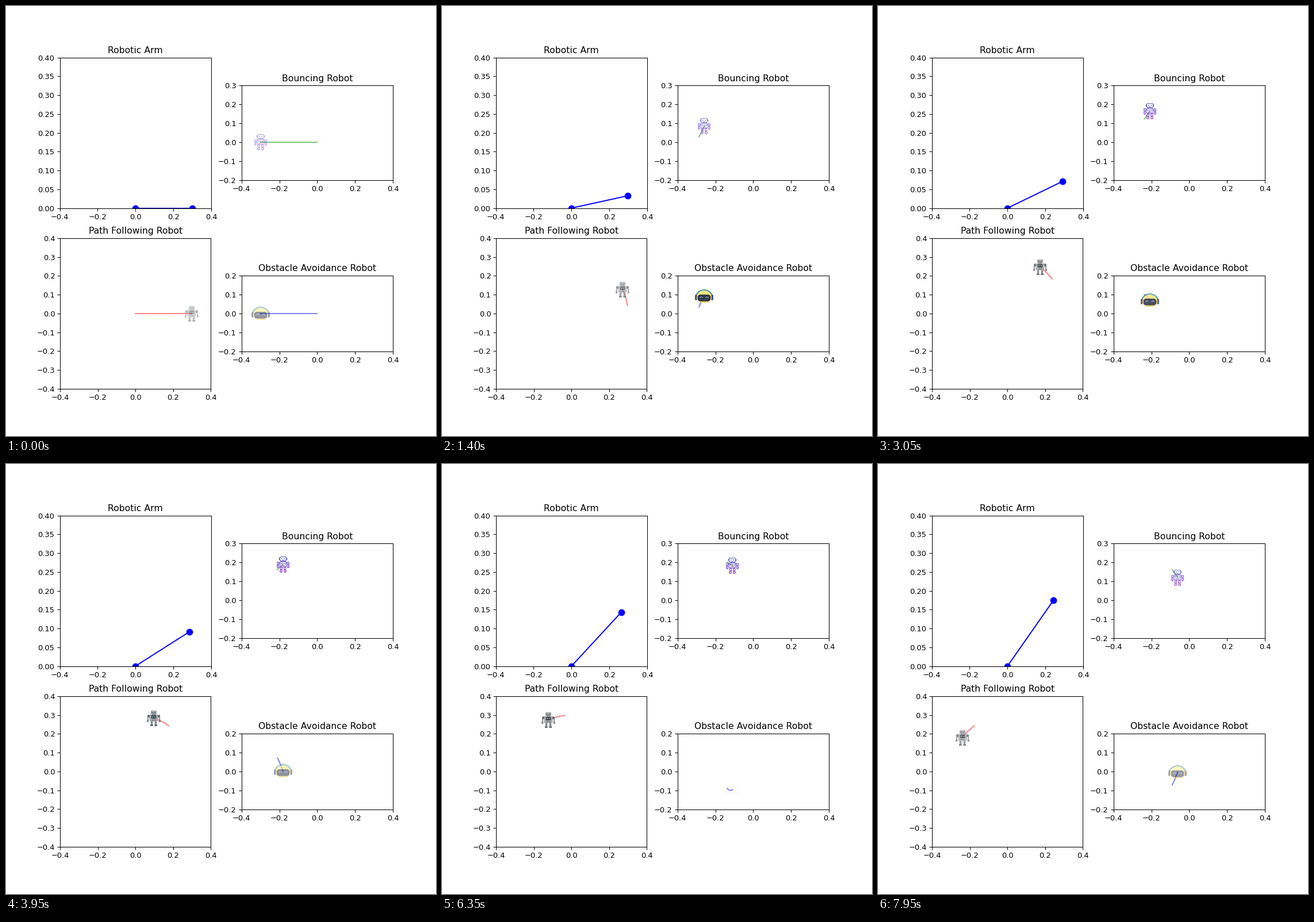
Write a matplotlib script that moves like this. It is 748x748 px and loops after 8000 ms.

```python
import numpy as np
import matplotlib.pyplot as plt
from matplotlib.animation import FuncAnimation
from matplotlib.offsetbox import AnnotationBbox, OffsetImage

FRAMES, INTERVAL = 160, 50
CYCLE = 400          # steps in one full turn
TRAIL = 20           # points kept in each trail
SIZE, DPI = 8, 93.5  # inches, 748 pixels a side
RES, HALF = 4, 18    # icon samples per pixel, half of the icon canvas

axis = (np.arange(2 * HALF * RES) + 0.5) / RES - HALF
X, Y = np.meshgrid(axis, axis)


# Signed distances in pixels, y pointing down
def box(cx, cy, w, h, r=0.0):
    qx = np.abs(X - cx) - w / 2 + r
    qy = np.abs(Y - cy) - h / 2 + r
    outside = np.hypot(np.maximum(qx, 0), np.maximum(qy, 0))
    return outside + np.minimum(np.maximum(qx, qy), 0) - r


def disc(cx, cy, r):
    return np.hypot(X - cx, Y - cy) - r


def ring(d, lw):
    return np.abs(d + lw / 2) - lw / 2


def pair(shape, cx, *args):
    return np.minimum(shape(-cx, *args), shape(cx, *args))


def cover(d):
    return np.clip(0.5 - d * RES, 0, 1)


def rgb(color):
    return np.array(color) / 255


def render(base, layers):
    img = np.ones(X.shape + (4,))
    img[..., :3] = rgb(base)
    img[..., 3] = 0
    for d, color in layers:
        a = cover(d)
        under = img[..., 3] * (1 - a)
        total = a + under
        mix = a[..., None] * rgb(color) + under[..., None] * img[..., :3]
        img[..., :3] = np.where(total[..., None] > 0,
                                mix / np.maximum(total, 1e-9)[..., None],
                                img[..., :3])
        img[..., 3] = total
    return img


def outline_bot():
    lw = 1.3
    parts = [
        ring(box(0, -10, 12, 8, 2), lw),
        pair(box, 6.7, -10, 1.4, 3.4, 0.6),
        pair(disc, 2.3, -10.4, 1.0),
        box(0, -7.9, 4, 0.9),
        ring(box(0, -0.6, 12.5, 10, 1.5), lw),
        pair(disc, 3.3, -1.6, 1.1),
        disc(0, -1.6, 1.1),
        box(0, 1.7, 7, 0.9),
        ring(pair(box, 8.6, -2.6, 4.4, 5, 1.6), lw),
        ring(pair(box, 8.9, 2.6, 3.6, 6.6, 1.3), lw),
        ring(pair(box, 3.3, 6.6, 4.2, 6, 0.8), lw),
        ring(pair(box, 3.4, 11.4, 4.6, 4.6, 1.2), lw),
    ]
    img = np.ones(X.shape + (4,))
    stops = [-14, 0, 14]
    colors = np.array([(92, 104, 184), (122, 88, 214), (160, 76, 194)]) / 255
    for k in range(3):
        img[..., k] = np.interp(Y, stops, colors[:, k])
    img[..., 3] = cover(np.minimum.reduce(parts))
    return img


def grey_bot():
    light, mid = (176, 180, 182), (146, 150, 153)
    dark, ink = (98, 103, 107), (58, 66, 74)
    return render(mid, [
        (pair(box, 8.8, -3.4, 4, 4.6, 1.6), dark),
        (pair(box, 10.2, 1.4, 2.4, 6.4, 1), mid),
        (ring(pair(box, 10.3, 5.2, 3.4, 3.2, 1.2), 1.1), dark),
        (pair(box, 3.5, 8.6, 3.8, 7, 0.5), mid),
        (pair(box, 3.5, 8.4, 3.8, 0.9), dark),
        (pair(box, 3.8, 12.6, 5, 2.6, 0.8), dark),
        (box(0, -10, 10.4, 6.8, 2.6), mid),
        (box(0, -12.2, 6.4, 2, 1), light),
        (pair(box, 2.3, -9.6, 2, 1.8, 0.6), (76, 122, 126)),
        (box(0, -6.4, 6, 1.4), dark),
        (box(0, -0.4, 15, 12, 2), mid),
        (box(0, -0.4, 13, 10, 1.4), light),
        (box(0, -2, 9, 5.8, 0.8), ink),
        (box(-1.8, -2.2, 2.4, 2.2), (92, 150, 148)),
        (box(2, -2.2, 2, 2.2), (150, 124, 124)),
        (box(0, 3.2, 8, 1.2), dark),
    ])


def headset_bot():
    teal, navy = (76, 154, 168), (58, 76, 112)
    brows = np.minimum(*[
        np.maximum(ring(disc(s * 4.8, 3.4, 2.9), 1.1), Y - 2.7)
        for s in (-1, 1)])
    band = np.maximum(ring(np.hypot(X / 1.17, Y - 1) - 13, 2.1), Y - 1)
    face = np.maximum(np.hypot(X / 1.14, Y - 0.4) - 11.5, Y - 11.2)
    return render((250, 220, 96), [
        (face, (247, 208, 78)),
        (np.maximum(face + 1, Y + 1), (255, 231, 124)),
        (band, teal),
        (pair(box, 13.9, 2, 3.8, 9.6, 1.7), navy),
        (pair(box, 12.3, 2, 1.6, 8, 0.6), (226, 160, 58)),
        (box(0, 2.8, 22.6, 11.6, 4.6), (40, 45, 62)),
        (brows, (120, 172, 232)),
    ])


# Motion, as functions of the step number
def turn(n):
    return 2 * np.pi * n / CYCLE


def bounce(n):
    return -0.3 + 0.6 * n / CYCLE, 0.2 * np.abs(np.sin(turn(n)))


def circle(n):
    return 0.3 * np.cos(turn(n)), 0.3 * np.sin(turn(n))


def weave(n):
    return -0.3 + 0.6 * n / CYCLE, 0.1 * np.sin(2.5 * turn(n))


def soft(n):
    return 0.5 + 0.5 * np.sin(turn(n))


def blink(n):
    return 0.5 + 0.5 * np.sin(2.5 * turn(n))


class Rover:
    def __init__(self, ax, path, fade, color, art):
        self.path, self.fade = path, fade
        self.trail, = ax.plot([], [], color=color, alpha=0.5)
        self.icon = OffsetImage(art, zoom=72 / DPI / RES)
        self.holder = AnnotationBbox(self.icon, (0, 0), frameon=False, pad=0)
        ax.add_artist(self.holder)

    def update(self, n):
        steps = np.arange(n - TRAIL + 1, n + 1)
        # slots not filled yet rest at the middle of the plot
        xs, ys = (np.where(steps >= 0, v, 0) for v in self.path(steps))
        self.trail.set_data(xs, ys)
        self.holder.xy = self.holder.xybox = (xs[-1], ys[-1])
        self.icon.image.set_alpha(float(np.clip(self.fade(n), 0, 1)))


fig, axes = plt.subplots(2, 2, figsize=(SIZE, SIZE), dpi=DPI)
(ax_arm, ax_bounce), (ax_path, ax_avoid) = axes


def setup(ax, title, ylim, equal=True):
    ax.set_title(title)
    ax.set_xlim(-0.4, 0.4)
    ax.set_ylim(*ylim)
    if equal:
        ax.set_aspect("equal")


setup(ax_arm, "Robotic Arm", (0, 0.4), equal=False)
setup(ax_bounce, "Bouncing Robot", (-0.2, 0.3))
setup(ax_path, "Path Following Robot", (-0.4, 0.4))
setup(ax_avoid, "Obstacle Avoidance Robot", (-0.2, 0.2))
ax_bounce.set_yticks(np.arange(-2, 4) / 10)
ax_path.set_yticks(np.arange(-4, 5) / 10)
ax_avoid.set_yticks(np.arange(-2, 3) / 10)
for ax in axes.flat:
    ax.set_xticks(np.arange(-2, 3) / 5)

arm, = ax_arm.plot([], [], "bo-", markersize=8)
rovers = [
    Rover(ax_bounce, bounce, soft, "green", outline_bot()),
    Rover(ax_path, circle, soft, "red", grey_bot()),
    Rover(ax_avoid, weave, blink, "blue", headset_bot()),
]


def update(n):
    angle = turn(n) / 4
    arm.set_data([0, 0.3 * np.cos(angle)], [0, 0.3 * np.sin(angle)])
    for rover in rovers:
        rover.update(n)
    return [arm]


anim = FuncAnimation(fig, update, frames=FRAMES, interval=INTERVAL,
                     repeat=True, repeat_delay=0, blit=False)
plt.show()
```
